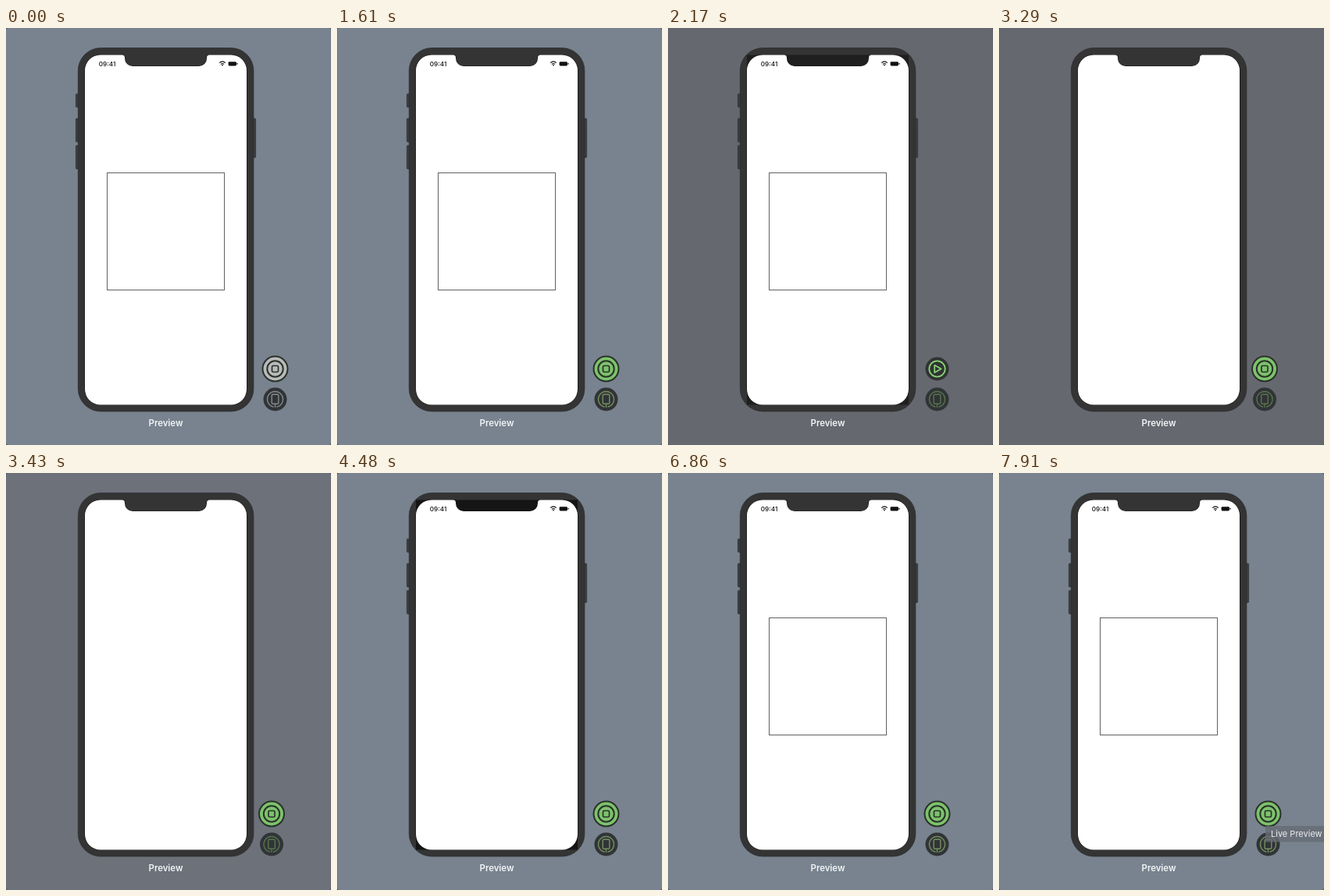
Write an HTML page that moves like this. It is 416 px wide and 534 px high and loops after 7980 ms.

```html
<!DOCTYPE html>
<html lang="en">
<head>
<meta charset="utf-8">
<title>Preview</title>
<style>
  html, body { margin: 0; width: 100%; height: 100%; overflow: hidden; background: #4a5059; }
  svg { display: block; width: 416px; height: 534px; }
  text { font-family: Inter, "Liberation Sans", sans-serif; }
</style>
</head>
<body>
<svg viewBox="0 0 416 534">
  <rect id="bg" width="416" height="534" rx="3"/>

  <g id="keys" fill="#3b3e42" stroke="#2b2e32" stroke-width=".7">
    <rect x="89.4" y="84.4" width="4" height="17" rx="1"/>
    <rect x="89.4" y="115.9" width="4" height="30" rx="1"/>
    <rect x="89.4" y="150.4" width="4" height="30" rx="1"/>
    <rect x="315.6" y="115.9" width="4" height="50" rx="1"/>
  </g>
  <rect x="92.3" y="25.5" width="224.6" height="465.5" rx="29" fill="#343434" stroke="#2a2b2d" stroke-width=".7"/>
  <rect id="black" x="101" y="34.5" width="207" height="448" fill="#000"/>

  <g id="screen">
    <path fill="#fff" stroke="#161616" stroke-width="1.2" paint-order="stroke"
      d="M121 34.5H148.5Q152 34.5 152 38V39A10 10 0 0 0 162 49H247A10 10 0 0 0 257 39V38Q257 34.5 260.5 34.5H288A20 20 0 0 1 308 54.5V462.5A20 20 0 0 1 288 482.5H121A20 20 0 0 1 101 462.5V54.5A20 20 0 0 1 121 34.5Z"/>
    <g id="status" fill="#111">
      <text x="118.8" y="48.6" font-size="8.2" font-weight="500">09:41</text>
      <g fill="none" stroke="#111" stroke-width="1.2">
        <path d="M273.2 44.6Q277 41.2 280.8 44.6"/>
        <path d="M274.9 46.4Q277 44.6 279.1 46.4"/>
      </g>
      <circle cx="277" cy="47.6" r=".9"/>
      <rect x="284.6" y="43.2" width="10.4" height="5.2" rx="1.4"/>
      <rect x="295.6" y="44.8" width="1" height="2" rx=".5"/>
    </g>
    <g id="sides" stroke="#606060" stroke-width="1" stroke-linecap="square">
      <path d="M129.5 335.5V185.5"/>
      <path d="M129.5 185.5H279.5"/>
      <path d="M279.5 185.5V335.5"/>
      <path d="M279.5 335.5H129.5"/>
    </g>
  </g>

  <g id="controls" fill="none" stroke-linejoin="round">
    <g id="stop" stroke="#293229" stroke-width="2">
      <circle id="disc" cx="344.5" cy="436.5" r="16"/>
      <circle cx="344.5" cy="436.5" r="10.2"/>
      <rect x="340.5" y="432.5" width="8" height="8" rx="1.5" stroke-width="1.7"/>
    </g>
    <g id="play" stroke-width="1.7">
      <circle cx="344.5" cy="436.5" r="15" fill="#303431" stroke="none"/>
      <circle cx="344.5" cy="436.5" r="10.2"/>
      <path d="M341.2 431.8V441.2L349.6 436.5Z"/>
    </g>
    <g id="device" stroke-width="1.4">
      <circle cx="344.5" cy="475.5" r="15" fill="#313437" stroke="none"/>
      <path d="M342.5 485.3A10 10 0 1 1 346.5 485.3"/>
      <rect x="340.2" y="469.3" width="8.6" height="12" rx="1.3"/>
      <path d="M344.5 482V486"/>
    </g>
  </g>

  <text x="204.5" y="510.3" font-size="11.4" font-weight="600" text-anchor="middle" fill="#f2f4f6">Preview</text>

  <g id="tip">
    <rect x="341" y="452" width="75" height="20.5" fill="#666c75" opacity=".8"/>
    <text x="348" y="466.2" font-size="11" fill="#eceef0">Live Preview</text>
  </g>
</svg>

<script>
const LOOP = 7980, STEP = 70;
const $ = id => document.getElementById(id);
const ramp = (t, a, b) => Math.min(1, Math.max(0, (t - a) / (b - a)));
const mix = (a, b, k) => `rgb(${a.map((v, i) => Math.round(v + (b[i] - v) * k))})`;
const show = (id, o) => $(id).setAttribute('opacity', +o);

const BLUE = [120, 131, 143], SLATE = [102, 104, 111];
const GREY = [185, 186, 187], GREEN = [125, 194, 108];
const ICON = [132, 136, 139], OLIVE = [116, 143, 94], DIM = [88, 115, 77], LIME = [139, 212, 121];

const T = { focus: 630, stopped: 1680, dark: 1890, still: 2170, start: 3290, boot: 3850, live: 4480, tip: 7560 };
const drawAt = [5040, 5600, 6160, 6720];

function render(t) {
  const still = t >= T.still && t < T.start;
  const booting = t >= T.start && t < T.boot;
  const idle = t >= T.stopped && t < T.start;

  $('bg').setAttribute('fill', t < T.still ? mix(BLUE, BLUE, 0) : mix(SLATE, BLUE, ramp(t, T.start, 3710)));
  show('keys', !booting);

  // The black screen lingers in the corners once content returns.
  let black = 0, content = 1;
  if (t >= T.dark && t < T.still) { black = 1; content = 0; }
  else if (still) black = .4 * (1 - ramp(t, T.still, 2310));
  else if (t >= T.boot && t < T.live) { black = ramp(t, 3780, 3990); content = 1 - black; }
  else if (t >= T.live) black = .6 * (1 - ramp(t, T.live, 4690));
  show('black', black);
  show('screen', content);
  show('status', t < T.start || t >= T.live);
  [...$('sides').children].forEach((side, i) =>
    side.setAttribute('opacity', +(t < T.start || t >= drawAt[i])));

  const focus = ramp(t, T.focus, 910);
  show('stop', !idle);
  show('play', idle);
  $('disc').setAttribute('fill', mix(GREY, GREEN, focus));
  $('play').setAttribute('stroke', mix(OLIVE, LIME, t >= T.still ? 1 : .3));
  $('device').setAttribute('stroke',
    still || booting ? mix(DIM, OLIVE, 0) : mix(ICON, OLIVE, focus));
  $('controls').setAttribute('transform', `translate(${booting ? -4.5 : 0} 0)`);
  show('tip', ramp(t, T.tip - STEP, 7910));
}

const begin = performance.now();
function tick() {
  const t = (performance.now() - begin) % LOOP;
  render(Math.floor(t / STEP) * STEP);
  requestAnimationFrame(tick);
}
render(0);
requestAnimationFrame(tick);
</script>
</body>
</html>
```
